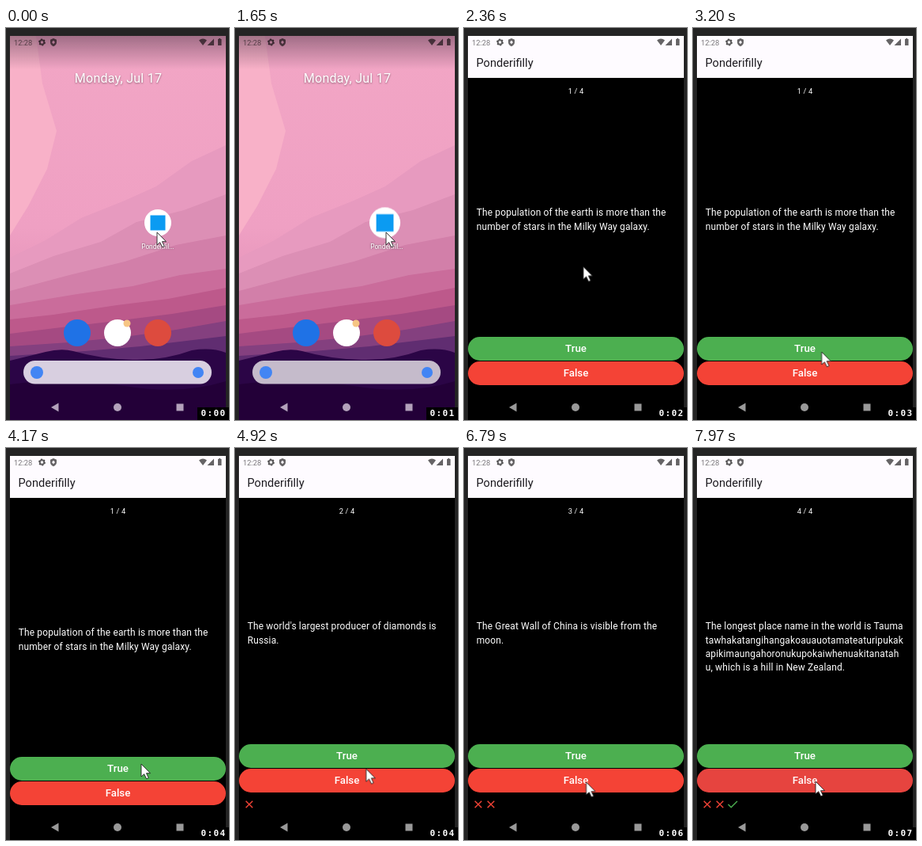
An HTML page for the animation above (8 s loop, 282x495 px).

```html
<!DOCTYPE html>
<html lang="en">
<head>
<meta charset="utf-8">
<title>Quiz app demo</title>
<style>
  html, body { margin: 0; width: 100%; height: 100%; overflow: hidden; background: #242424; }
  body { font-family: Roboto, sans-serif; }
  #stage { position: relative; width: 282px; height: 495px; overflow: hidden; background: #242424; }
  #stage svg { position: absolute; left: 0; top: 0; }
  #stage * { animation-duration: 8s; animation-iteration-count: infinite; animation-timing-function: linear; }
  #stage .cut { animation-timing-function: step-end; }

  /* Launcher */
  .date { font-size: 16px; letter-spacing: .25px; fill: #fff; filter: drop-shadow(0 1px 1px #0006); }
  .label { font-size: 8.3px; fill: #fff; filter: drop-shadow(0 0 1px #0008); }
  #icon { transform-origin: 192px 246px; animation-name: press; }
  #search { fill: #d8cfe0; animation-name: dim; }
  #shade { animation-name: p1home; }
  @keyframes press { 0%, 18.8% { transform: none; } 20.5%, to { transform: translate(-2.5px, 0) scale(1.15); } }
  @keyframes dim { 0%, 16.8% { fill: #d8cfe0; } 20.5%, to { fill: #c5bbcb; } }
  @keyframes p1home { 0%, 20.7% { opacity: 1; } 22.3%, to { opacity: 0; } }

  /* Quiz app */
  #app { position: absolute; left: 5px; top: 10px; width: 273px; height: 485px; background: #000; color: #fff;
    transform-origin: 0 0; animation-name: launch; }
  #app div { position: absolute; }
  .bar { left: 0; top: 0; width: 273px; height: 52.5px; background: #fefbff; }
  .title { left: 10.5px; top: 24px; font-size: 14.6px; line-height: 20px; color: #1d1b20; }
  .page { left: 0; top: 0; width: 273px; height: 485px; opacity: 0; }
  .count { left: 0; width: 100%; top: 64px; text-align: center; font-size: 9.3px; line-height: 12px; letter-spacing: .17px; }
  .text { left: 10.7px; top: 207.4px; font-size: 11.95px; line-height: 17.33px; letter-spacing: .166px; white-space: pre; }
  #p1 .text { top: 215.4px; }
  #buttons { left: 0; top: 380px; width: 273px; animation-name: lift; }
  .button { left: 0; width: 273px; height: 30px; border-radius: 15px; font-size: 13.3px; font-weight: 500;
    line-height: 30px; text-align: center; }
  .true { top: 0; background: #4caf50; }
  .false { top: 31.3px; background: #f44336; animation-name: tap; }
  #p1 { animation-name: p1; }
  #p2 { animation-name: p2; }
  #p3 { animation-name: p3; }
  #p4 { animation-name: p4; }
  #marks { fill: none; stroke-width: 1.4; }
  #marks path { opacity: 0; }
  #m1 { animation-name: from2; }
  #m2 { animation-name: from3; }
  #m3 { animation-name: p4; }
  @keyframes launch {
    0% { opacity: 0; }
    21.375% { opacity: 1; transform: translate(108px, 138px) scale(.45); clip-path: inset(0 0 40px round 40px); }
    22% { opacity: 1; transform: translate(32px, 62px) scale(.78); clip-path: inset(0 0 24px round 18px); }
    22.375% { opacity: 1; transform: translate(14px, 27px) scale(.908); clip-path: inset(0 0 12.5px round 9px); }
    23.75% { opacity: 1; transform: translate(3.6px, 8px) scale(.975); clip-path: inset(0 0 5px round 6px); }
    25% { opacity: 1; transform: translate(1px, 2px) scale(.993); clip-path: inset(0 0 1px round 3px); }
    26.5%, to { opacity: 1; transform: none; clip-path: none; }
  }
  @keyframes lift { 0% { transform: none; } 57.5%, to { transform: translateY(-16px); } }
  @keyframes tap {
    0% { background: #f44336; }
    78.25% { background: #e6443f; }
    82% { background: #f44336; }
    98.5%, to { background: #e6443f; }
  }
  @keyframes p1 { 0% { opacity: 1; } 57.5%, to { opacity: 0; } }
  @keyframes p2 { 0% { opacity: 0; } 57.5% { opacity: 1; } 78.25%, to { opacity: 0; } }
  @keyframes p3 { 0% { opacity: 0; } 78.25% { opacity: 1; } 98.5%, to { opacity: 0; } }
  @keyframes p4 { 0% { opacity: 0; } 98.5%, to { opacity: 1; } }
  @keyframes from2 { 0% { opacity: 0; } 57.5%, to { opacity: 1; } }
  @keyframes from3 { 0% { opacity: 0; } 78.25%, to { opacity: 1; } }

  /* System bars, pointer and clock */
  .status { fill: #0008; font-size: 9.3px; }
  .nav { fill: #999; animation-name: nav; }
  @keyframes nav { 0% { fill: #b3a2bb; } 26.5%, to { fill: #999; } }
  #pointer { animation-name: move; }
  @keyframes move {
    0%, 27.5% { transform: translate(191px, 258px); }
    29.5% { transform: translate(151px, 301px); }
    31.25% { transform: translate(131px, 345px); }
    33.75% { transform: translate(136px, 385px); }
    36.75%, 38% { transform: translate(160px, 407px); }
    41% { transform: translate(164px, 410px); }
    44.1%, 48.1% { transform: translate(161px, 408px); }
    52.1%, 60.2% { transform: translate(171px, 399px); }
    65% { transform: translate(152px, 422px); }
    70.3%, 70.7% { transform: translate(133px, 429px); }
    73%, 78.25% { transform: translate(135px, 424px); }
    82% { transform: translate(149px, 423px); }
    87.75%, 89% { transform: translate(160px, 421px); }
    90.1%, 92.3% { transform: translate(159px, 421px); }
    95.4%, to { transform: translate(155px, 421px); }
  }
  #clock { position: absolute; left: 242px; top: 479px; width: 40px; height: 16px; overflow: hidden; background: #000; }
  #clock div { padding-left: 4.5px; font: bold 11px/16px "DejaVu Sans Mono", monospace; letter-spacing: 1.38px;
    color: #fff; white-space: pre; animation-name: tick; animation-timing-function: steps(8); }
  @keyframes tick { to { transform: translateY(-128px); } }
</style>
</head>
<body>
<div id="stage">
  <svg width="282" height="495">
    <defs>
      <linearGradient id="sky" x2="0" y2="1">
        <stop offset="0" stop-color="#f2a6c5"/>
        <stop offset=".5" stop-color="#efa0c3"/>
        <stop offset="1" stop-color="#cf7aa8"/>
      </linearGradient>
      <linearGradient id="scrim" x2="0" y2="1">
        <stop offset="0" stop-color="#302030" stop-opacity=".42"/>
        <stop offset="1" stop-color="#302030" stop-opacity="0"/>
      </linearGradient>
      <clipPath id="screen"><path d="M5 10H278V495H5Z"/></clipPath>
    </defs>
    <g clip-path="url(#screen)">
      <path fill="url(#sky)" d="M5 10H278V495H5Z"/>
      <path fill="#f8b1c8" d="M5 10H38L46 70 64 130 52 178 28 225 5 262Z"/>
      <path fill="#e79abf" d="M278 148L235 168 190 200 150 218 95 240 50 268 5 290V495H278Z"/>
      <path fill="#dc8fb5" d="M278 210L225 230 165 245 120 270 60 288 5 310V495H278Z"/>
      <path fill="#d27fa9" d="M278 262L215 274 150 295 80 312 5 332V495H278Z"/>
      <path fill="#ca6c9b" d="M278 304L220 312 160 326 90 336 5 350V495H278Z"/>
      <path fill="#bd598b" d="M278 328L205 342 140 350 60 362 5 368V495H278Z"/>
      <path fill="#a54a82" d="M278 350L210 361 130 371 70 378 5 386V495H278Z"/>
      <path fill="#84407f" d="M278 370L215 381 150 390 80 397 5 402V495H278Z"/>
      <path fill="#602d71" d="M278 389L220 396 170 402 100 408 5 414V495H278Z"/>
      <path fill="#2b0546" d="M5 420Q30 414 50 409T85 408Q120 418 160 419T235 407Q260 403 278 410V495H5Z"/>
      <path fill="#230038" d="M5 450Q80 440 150 452T278 446V495H5Z"/>
      <path id="shade" fill="url(#scrim)" d="M5 10H278V52H5Z"/>
      <text class="date" x="142" y="69" text-anchor="middle">Monday, Jul 17</text>
      <g id="icon">
        <circle cx="192" cy="246" r="17" fill="#fff"/>
        <path fill="#0b9bf2" d="M182.500 236.500h19v19h-19z"/>
      </g>
      <text class="label" x="192" y="279" text-anchor="middle">Ponderifil...</text>
      <circle cx="90" cy="385" r="17" fill="#1f72e6"/>
      <circle cx="141" cy="385" r="17" fill="#fff"/>
      <circle cx="153" cy="373" r="4.500" fill="#f6c584"/>
      <circle cx="192" cy="385" r="17" fill="#dd4b3e"/>
      <rect id="search" x="22" y="420" width="238" height="29.500" rx="14.700"/>
      <circle cx="39" cy="435" r="8" fill="#4285f4"/>
      <circle cx="243" cy="435" r="7" fill="#4285f4"/>
    </g>
  </svg>

  <div id="app" class="cut">
    <div class="bar"></div>
    <div class="title">Ponderifilly</div>
    <div id="p1" class="page cut">
      <div class="count">1 / 4</div>
      <div class="text">The population of the earth is more than the
number of stars in the Milky Way galaxy.</div>
    </div>
    <div id="p2" class="page cut">
      <div class="count">2 / 4</div>
      <div class="text">The world's largest producer of diamonds is
Russia.</div>
    </div>
    <div id="p3" class="page cut">
      <div class="count">3 / 4</div>
      <div class="text">The Great Wall of China is visible from the
moon.</div>
    </div>
    <div id="p4" class="page cut">
      <div class="count">4 / 4</div>
      <div class="text">The longest place name in the world is Tauma
tawhakatangihangakoauauotamateaturipukak
apikimaungahoronukupokaiwhenuakitanatah
u, which is a hill in New Zealand.</div>
    </div>
    <div id="buttons" class="cut">
      <div class="button true">True</div>
      <div class="button false cut">False</div>
    </div>
    <svg id="marks" width="273" height="485">
      <path id="m1" class="cut" stroke="#f44336" d="M8.700 435.700l8.600 8.600m0-8.600l-8.600 8.600"/>
      <path id="m2" class="cut" stroke="#f44336" d="M24.700 435.700l8.600 8.600m0-8.600l-8.600 8.600"/>
      <path id="m3" class="cut" stroke="#4caf50" d="M39.500 440l3.700 3.700 7.800-7.800"/>
    </svg>
  </div>

  <svg width="282" height="495">
    <g class="status">
      <text x="10" y="21.500">12:28</text>
      <circle cx="45.500" cy="18" r="2.700" fill="none" stroke="#0009" stroke-width="2"/>
      <circle cx="45.500" cy="18" r="3.900" fill="none" stroke="#0009" stroke-width="1.200" stroke-dasharray="2 2.080"/>
      <path fill="#0009" fill-rule="evenodd" d="M60 13l4 1.700V18q0 3.500-4 5.200-4-1.700-4-5.200v-3.300zM60 15.800l-2 2.200 2 2.200 2-2.200z"/>
      <path fill="#0009" d="M244 15.500q5-4 10 0l-5 6.500zM263 13.500V22h-8.500zM268 14h1.200v-1h2v1h1.300v8H268z"/>
    </g>
    <g class="nav cut">
      <path d="M57 479l9.500-5.500v11z"/>
      <circle cx="141" cy="479" r="5"/>
      <path d="M215.500 474.500h9v9h-9z"/>
    </g>
    <path id="pointer" fill="#fff" stroke="#222" stroke-width=".9" stroke-linejoin="round"
      d="M0 0V16L3.700 12.700 6.700 18.800 9.300 17.600 6.500 11.700H11.500Z"/>
  </svg>

  <div id="clock"><div>0:00
0:01
0:02
0:03
0:04
0:05
0:06
0:07</div></div>
</div>
</body>
</html>
```
